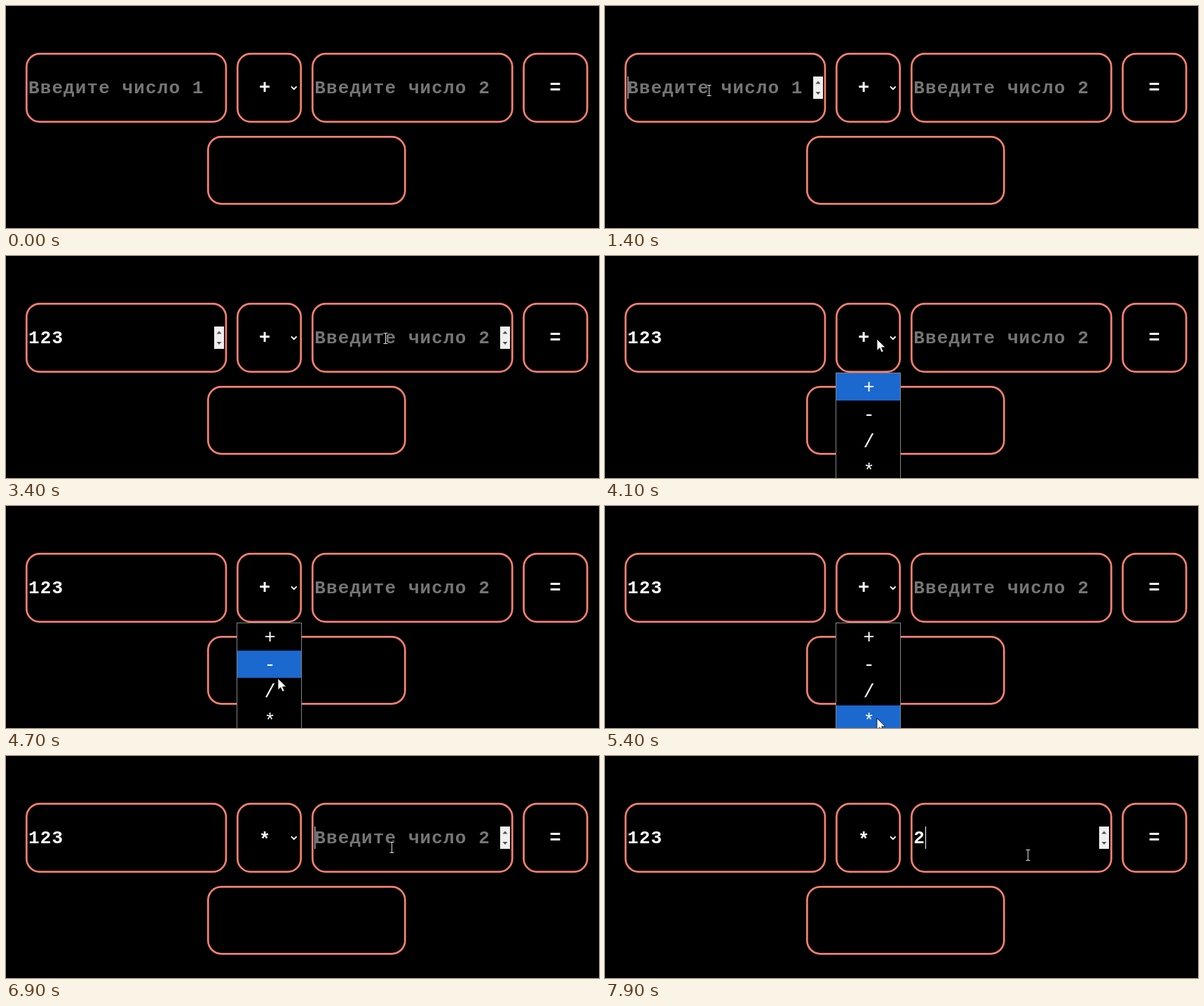
An HTML page that plays this animation: 846x318 px, repeating every 8000 ms.

```html
<!DOCTYPE html>
<html lang="ru">
<head>
<meta charset="utf-8">
<style>
html, body { margin: 0; height: 100%; overflow: hidden; background: #000; }
svg { display: block; width: 846px; height: 318px; }
text { font: bold 26px "Liberation Mono", monospace; letter-spacing: 1.1px; fill: #fff; white-space: pre; }
.mid { text-anchor: middle; letter-spacing: 0; font-size: 27px; }
.option { font-weight: normal; }
.box { fill: none; stroke: #fa8072; stroke-width: 2.7; }
.empty { fill: #757575; }
</style>
</head>
<body>
<svg viewBox="0 0 846 318">
  <defs>
    <g id="spinner">
      <rect width="14" height="32" fill="#efefef"/>
      <path d="M3.5 10.5h7l-3.5-4zM3.5 22h7l-3.5 4z" fill="#505050"/>
    </g>
  </defs>
  <rect class="box" x="29.3" y="68.3" width="284.6" height="97.6" rx="19"/>
  <rect class="box" x="330.3" y="68.3" width="90.4" height="97.6" rx="19"/>
  <rect class="box" x="437.3" y="68.3" width="285" height="97.6" rx="19"/>
  <rect class="box" x="738.6" y="68.3" width="90.6" height="97.6" rx="19"/>
  <rect class="box" x="288.3" y="187.3" width="281" height="96" rx="19"/>

  <g id="ring" fill="none">
    <rect x="329.8" y="67.8" width="91.4" height="98.6" rx="19.5" stroke="#000" stroke-width="2.2"/>
    <rect x="328.7" y="66.7" width="93.6" height="100.8" rx="20.5" stroke="#fff" stroke-width="1.3"/>
  </g>

  <text id="first" x="32" y="125"></text>
  <text id="second" x="440.3" y="125"></text>
  <text id="sign" class="mid" x="369" y="125"></text>
  <text class="mid" x="783.5" y="125">=</text>
  <path d="M407 115.3l3.8 3.9 3.8-3.9" fill="none" stroke="#fff" stroke-width="1.9"/>

  <use id="spin1" href="#spinner" x="297" y="101"/>
  <use id="spin2" href="#spinner" x="705" y="101"/>
  <rect id="caret" y="101" width="1" height="32" fill="#fff"/>

  <g id="menu">
    <rect x="329.5" y="167.5" width="92" height="160" stroke="#858585"/>
    <rect id="mark" x="330" width="91" height="39" fill="#1b68cf"/>
    <text class="mid option" x="376.5" y="196">+</text>
    <text class="mid option" x="376.5" y="235">-</text>
    <text class="mid option" x="376.5" y="274">/</text>
    <text class="mid option" x="376.5" y="316">*</text>
  </g>

  <path id="arrow" d="M0 0v16.5l3.8-3.6 2.6 6 2.8-1.2-2.6-5.8h5.2z" fill="#fff" stroke="#000" stroke-width=".8"/>
  <g id="beam" fill="none">
    <path d="M-3-7.5H3M0-7.5V7.5M-3 7.5H3" stroke="#000" stroke-width="2.6"/>
    <path d="M-3-7.5H3M0-7.5V7.5M-3 7.5H3" stroke="#ddd"/>
  </g>
</svg>
<script>
const LOOP = 8000, STEP = 100, PITCH = 16.7;
const el = id => document.getElementById(id);
const show = (id, on) => el(id).style.display = on ? '' : 'none';

// Pointer stops: time, x, y
const path = [
  [600, 300, 215], [1200, 148, 121], [1700, 148, 121], [2500, 610, 116],
  [2700, 616, 117], [2900, 616, 117], [3400, 541, 118], [3500, 541, 118],
  [4000, 388, 119], [4200, 388, 119], [4700, 388, 247], [5000, 388, 281],
  [5100, 388, 281], [5400, 388, 304], [6400, 388, 304], [6700, 550, 131],
  [7800, 550, 131], [7900, 603, 141.5], [8000, 603, 141.5]
];
const clicks = { first: 1200, open: 4000, pick: 6000, second: 6900 };
const keys1 = [2300, 2500, 2700], keys2 = [7600];

function pointer(t) {
  const i = path.findIndex(p => p[0] > t);
  if (i < 1) return path[0].slice(1);
  const [t0, x0, y0] = path[i - 1], [t1, x1, y1] = path[i];
  const k = (t - t0) / (t1 - t0);
  return [x0 + (x1 - x0) * k, y0 + (y1 - y0) * k];
}

function field(id, value, hint) {
  el(id).textContent = value || hint;
  el(id).setAttribute('class', value ? '' : 'empty');
}

function draw(t) {
  const [x, y] = pointer(t), seen = t >= 600;
  const over = (l, r) => seen && x > l && x < r && y > 67 && y < 167;
  const over1 = over(28, 315), over2 = over(436, 724), beam = over1 || over2;
  const focus1 = t >= clicks.first && t < clicks.open, focus2 = t >= clicks.second;
  const typed1 = keys1.filter(k => k <= t), typed2 = keys2.filter(k => k <= t);

  field('first', '123'.slice(0, typed1.length), 'Введите число 1');
  field('second', '2'.slice(0, typed2.length), 'Введите число 2');
  show('spin1', over1 || focus1);
  show('spin2', over2 || focus2);

  // The caret blinks from the last click or key
  const typed = focus2 ? typed2 : typed1;
  const since = Math.max(focus2 ? clicks.second : clicks.first, ...typed);
  show('caret', (focus1 || focus2) && (t - since) % 1000 < 500);
  el('caret').setAttribute('x', (focus2 ? 440.3 : 32.3) + typed.length * PITCH);

  const picked = t >= clicks.pick;
  el('sign').textContent = picked ? '*' : '+';
  el('sign').setAttribute('y', picked ? 128 : 125);
  show('ring', picked && !focus2);
  show('menu', t >= clicks.open && !picked);
  const row = Math.max(0, Math.min(3, Math.floor((y - 170) / 39)));
  el('mark').setAttribute('y', 168 + row * 39.2);

  show('arrow', seen && !beam);
  show('beam', beam);
  el(beam ? 'beam' : 'arrow').setAttribute('transform',
    `translate(${Math.round(x) + (beam ? .5 : 0)} ${Math.round(y)})`);
}

let start;
function tick(now) {
  start ??= now;
  draw(Math.floor((now - start) % LOOP / STEP) * STEP);
  requestAnimationFrame(tick);
}
draw(0);
requestAnimationFrame(tick);
</script>
</body>
</html>
```
